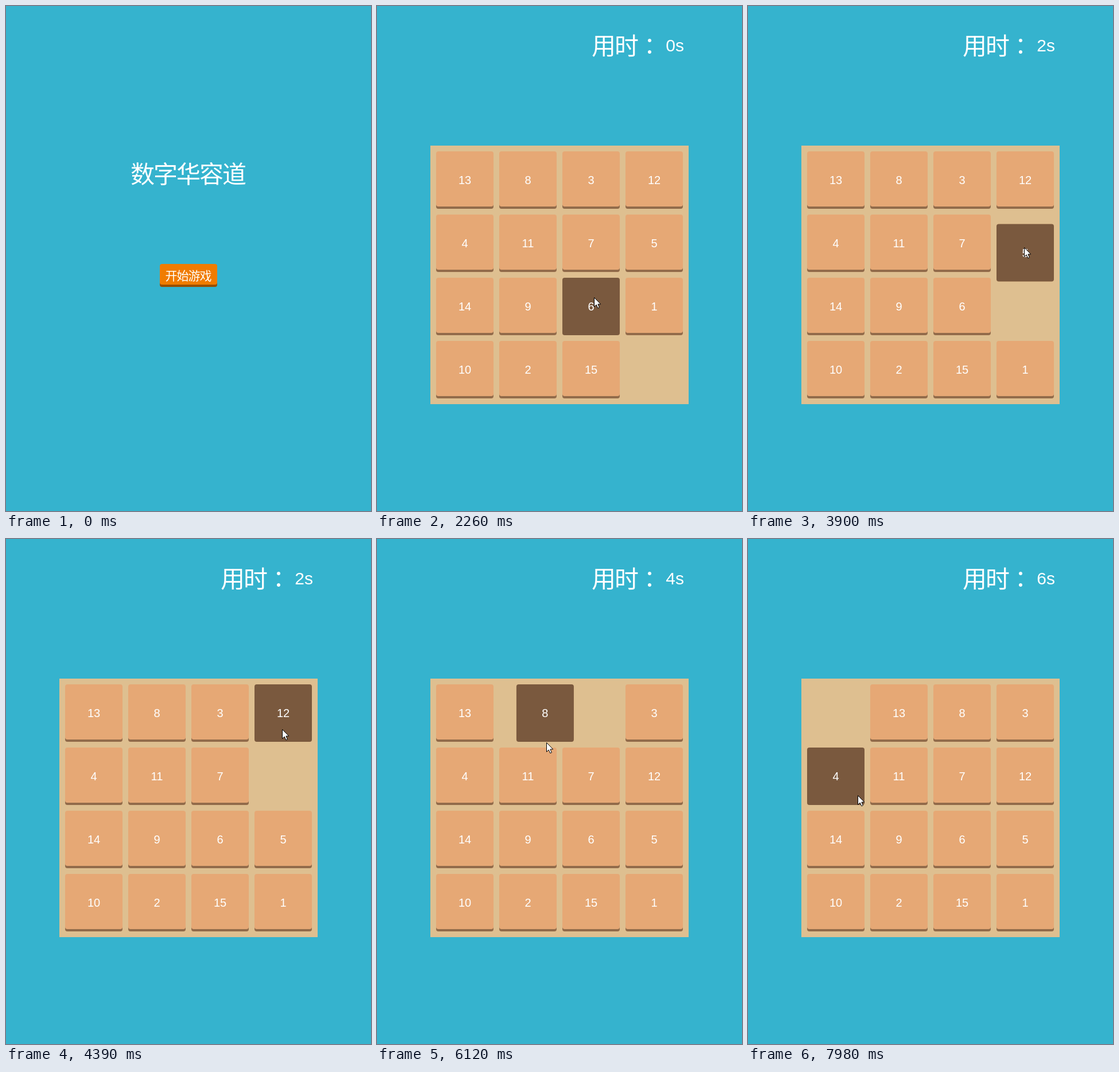
An HTML page with a canvas that plays this animation: 636 px wide and 879 px high, repeating every 8000 ms.

```html
<!DOCTYPE html>
<html lang="zh-CN">
<head>
<meta charset="utf-8">
<title>数字华容道</title>
<style>
  html, body { margin: 0; width: 100%; height: 100%; overflow: hidden; background: #35b3ce; }
  canvas { display: block; }
</style>
</head>
<body>
<canvas id="stage" width="636" height="879"></canvas>
<script>
const ctx = document.getElementById('stage').getContext('2d');

const LOOP = 8000;
const POINTER_ENTERS = 100;
const PRESS = 1420;        // start button goes down
const GAME_START = 1570;
const SLIDE = 500;         // duration of one tile move
const HOVER_LAG = 60;      // hover state trails the pointer
const TILE = 100, PITCH = 110, LEFT = 103, TOP = 253;

const CJK = '"Noto Sans CJK SC", "Noto Sans CJK JP", sans-serif';
const CJK_CENTERED = '"Noto Sans CJK JP", sans-serif';  // centred full-width colon
const LATIN = '"Liberation Sans", Arial, sans-serif';

const board = [
  13, 8, 3, 12,
  4, 11, 7, 5,
  14, 9, 6, 1,
  10, 2, 15, 0
];
// Click times; each clicked tile slides into the gap
const clicks = [[3022, 1], [3825, 5], [4608, 12], [5375, 3], [5984, 8], [6958, 13]];

const cellPosition = i => ({ x: LEFT + (i % 4) * PITCH, y: TOP + Math.floor(i / 4) * PITCH });

function playOut(board, clicks) {
  const tiles = new Map();
  board.forEach((number, i) => {
    if (number) tiles.set(number, { from: cellPosition(i), to: cellPosition(i), start: 0 });
  });
  let gap = board.indexOf(0);
  for (const [start, number] of clicks) {
    Object.assign(tiles.get(number), { to: cellPosition(gap), start });
    gap = board.indexOf(number);
  }
  return tiles;
}
const tiles = playOut(board, clicks);

// Pointer stops: [departure towards the stop, x, y]
const pointerOrigin = { x: 534, y: 799 };
const pointerStops = [
  [POINTER_ENTERS, 331, 461],
  [2110, 445, 574], [2455, 474, 526],
  [3410, 481, 420], [4060, 481, 331],
  [4690, 375, 335], [5600, 285, 345],
  [6050, 305, 363], [6270, 200, 338],
  [6948, 250, 348], [7180, 235, 490], [7750, 191, 446]
];

const clamp01 = v => Math.max(0, Math.min(1, v));
const smooth = u => u * u * (3 - 2 * u);
const mix = (a, b, k) => ({ x: a.x + (b.x - a.x) * k, y: a.y + (b.y - a.y) * k });

// Longer trips take longer, in proportion to the root of the distance
function pointerAt(t) {
  if (t < POINTER_ENTERS) return null;
  let position = pointerOrigin;
  for (const [leave, x, y] of pointerStops) {
    if (t < leave) break;
    const travel = 27 * Math.sqrt(Math.hypot(x - position.x, y - position.y));
    position = mix(position, { x, y }, smooth(clamp01((t - leave) / travel)));
  }
  return position;
}

function text(str, x, baseline, size, family, { align = 'center', weight = 400, spacing = 0 } = {}) {
  ctx.font = `${weight} ${size}px ${family}`;
  ctx.textAlign = align;
  ctx.letterSpacing = spacing + 'px';
  ctx.fillStyle = '#fff';
  ctx.fillText(str, x, baseline);
}

// Raised block with a 4px lower edge; flat and dark while hovered
function block({ x, y }, w, h, color, pointer) {
  const hovered = pointer && pointer.x >= x && pointer.x < x + w
    && pointer.y >= y && pointer.y < y + h;
  const shape = new Path2D();
  shape.roundRect(x, y, w, h, 4);
  ctx.fillStyle = color;
  ctx.fill(shape);

  ctx.fillStyle = `rgba(0, 0, 0, ${hovered ? 0.47 : 0.365})`;
  if (!hovered) shape.roundRect(x, y, w, h - 4, 4);
  ctx.fill(shape, 'evenodd');
}

function drawMenu(t, pointer) {
  const lift = t >= PRESS ? 1 : 0;
  text('数字华容道', 317, 308 - lift, 42, CJK, { spacing: -2 });
  block({ x: 268, y: 449 - lift }, 100, 40, '#f07c00', pointer);
  text('开始游戏', 317.5, 477 - lift, 21, CJK, { weight: 500, spacing: -1 });
}

function drawGame(t, pointer) {
  text('用时', 374, 85, 42, CJK, { align: 'left', spacing: -2 });
  text('：', 455, 85, 40, CJK_CENTERED, { align: 'left' });
  text(Math.floor((t - GAME_START) / 1000) + 's', 535, 79, 30, LATIN, { align: 'right' });

  ctx.fillStyle = '#debf90';
  ctx.fillRect(93, 243, 450, 450);

  for (const [number, { from, to, start }] of tiles) {
    const position = mix(from, to, clamp01((t - start) / SLIDE));
    block(position, TILE, TILE, '#e6a875', pointer);
    text(number, position.x + 50, position.y + 57, 20, LATIN);
  }
}

const arrow = new Path2D('M.5 .5V16.5L4.2 13L6.8 18.8L9.4 17.7L6.9 12H11.8Z');

function drawPointer({ x, y }) {
  ctx.save();
  ctx.translate(Math.round(x), Math.round(y));
  ctx.fillStyle = '#fff';
  ctx.fill(arrow);
  ctx.strokeStyle = '#000';
  ctx.stroke(arrow);
  ctx.restore();
}

function render(now) {
  const t = now % LOOP;
  const pointer = pointerAt(t);
  const hoverPoint = pointerAt(t - HOVER_LAG);

  ctx.fillStyle = '#35b3ce';
  ctx.fillRect(0, 0, 636, 879);
  (t < GAME_START ? drawMenu : drawGame)(t, hoverPoint);
  if (pointer) drawPointer(pointer);
}

let origin;
function tick(now) {
  origin ??= now;
  render(now - origin);
  requestAnimationFrame(tick);
}
render(0);
requestAnimationFrame(tick);
</script>
</body>
</html>
```
